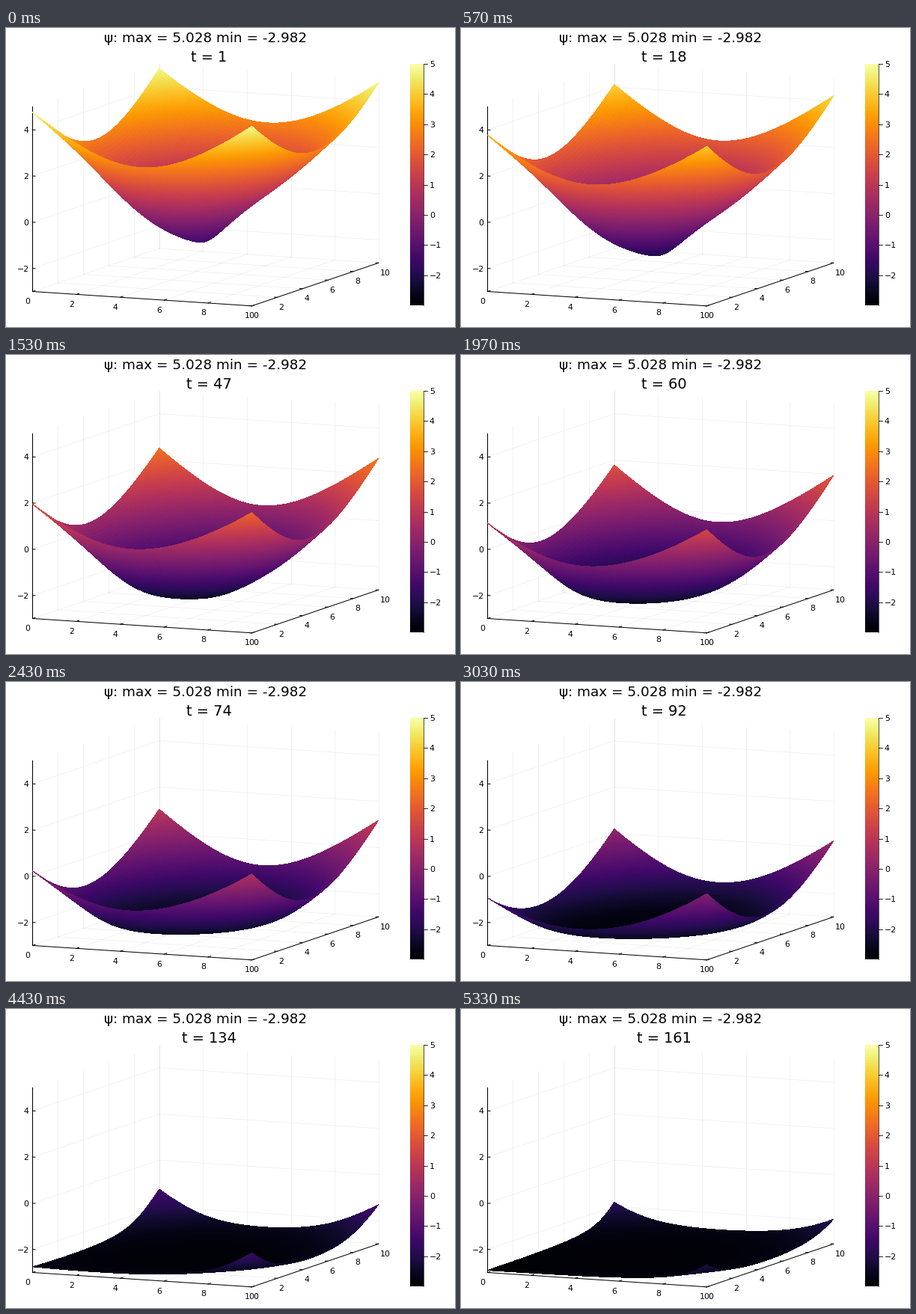
A matplotlib script that plays this animation: 600 by 400 pixels, repeating every 5.36 s.

```python
import numpy as np
import matplotlib.pyplot as plt
from matplotlib.animation import FuncAnimation

W, H, DPI = 600, 400, 100
LOOP_MS, TICK_MS = 5360, 20
STEP_MS = 100 / 3
PX = 72 / DPI
ZMIN, ZMAX = -3, 5
plt.rcParams["font.family"] = "DejaVu Sans"

fig = plt.figure(figsize=(W / DPI, H / DPI), dpi=DPI, facecolor="white")
ax = fig.add_axes([0, 0, 1, 1])
ax.set_xlim(0, W)
ax.set_ylim(H, 0)
ax.axis("off")


def project(x, y, z):
    """Parallel projection of the 10 x 10 x 8 box to stage pixels."""
    return (35.5 + 29.3 * x + 16.92 * y,
            352.5 + 1.93 * x - 5.75 * y - 30.9 * (z - ZMIN))


def segment(p, q, **style):
    (x0, y0), (x1, y1) = project(*p), project(*q)
    ax.plot([x0, x1], [y0, y1], **style)


def label(x, y, value, ha="left"):
    ax.text(x, y, str(value).replace("-", "\u2212"), fontsize=11 * PX,
            ha=ha, va="center_baseline")


# Grid, axes and tick labels
grid = dict(color="black", alpha=0.07, lw=0.5, zorder=1)
line = dict(color="black", lw=PX, zorder=2, snap=False)
for v in range(0, 11, 2):
    segment((v, 0, ZMIN), (v, 10, ZMIN), **grid)
    segment((v, 10, ZMIN), (v, 10, ZMAX), **grid)
    segment((0, v, ZMIN), (10, v, ZMIN), **grid)
    segment((0, v, ZMIN), (0, v, ZMAX), **grid)
    segment((v, 0, ZMIN), (v, 0.2, ZMIN), **line)
    segment((10, v, ZMIN), (9.88, v, ZMIN), **line)
    x, y = project(v, 0, ZMIN)
    label(x - 10, y + 12.5, v)
    x, y = project(10, v, ZMIN)
    label(x + 2, y + 12.5, v)
for v in range(-2, 5, 2):
    segment((0, 0, v), (0, 10, v), **grid)
    segment((0, 10, v), (10, 10, v), **grid)
    segment((0, 0, v), (0.12, 0, v), **line)
    label(30.5, project(0, 0, v)[1], v, "right")
segment((0, 0, ZMIN), (0, 0, ZMAX), **line)
segment((0, 0, ZMIN), (10, 0, ZMIN), **line)
segment((10, 0, ZMIN), (10, 10, ZMIN), **line)

# Colour bar
ax.pcolormesh([540, 558], np.linspace(371, 48, 257), np.arange(256)[:, None],
              cmap="inferno", antialiased=False)
ax.plot([558, 558], [48, 371], color="black", lw=0.5)
for v in range(-2, 6):
    y = 48 + (ZMAX - v) * 323 / 8
    ax.plot([558, 563], [y, y], color="black", lw=0.6)
    label(566, y, v)

ax.text(267, 19, "ψ: max = 5.028 min = -2.982", fontsize=18.4 * PX,
        ha="center", va="baseline")
counter = ax.text(271, 45, "", fontsize=19.4 * PX, ha="center", va="baseline")

# Rows run from back to front so that near cells cover far ones
N = 90
X, Y = np.meshgrid(np.linspace(0, 10, N + 1), np.linspace(10, 0, N + 1))
DX, DY = X - 5, Y - 5
R, THETA = np.hypot(DX, DY), np.arctan2(DY, DX)

CONE = 0.95 + 0.96 * np.hypot(R, 0.35)
RING = 0.3 * np.exp(-((R - 3) / 2) ** 2)
LEAN = -0.35 * (0.87 * DX + 0.5 * DY) * np.exp(-R ** 2 / 8)
LOBES = (0.3 * np.cos(3 * THETA + 0.96) - 0.2 * np.sin(THETA)) \
    * np.tanh(R / 4) ** 2
CORNER = (1 - (X + Y) / 20) ** 3
SADDLE = DX * DY / 25


def height(t):
    """A sinking cone, uneven by direction, that settles on a soft floor."""
    sink = 7.9 * np.tanh((t / 120) ** 1.2)
    u = (CONE - RING - LEAN - sink
         - (1 - np.exp(-t / 20)) * LOBES
         - 2.4 * (t / 134) ** 4 * CORNER
         - 0.5 * (t / 161) ** 3 * SADDLE)
    return ZMIN + u / 2 + np.sqrt(u * u / 4 + 0.5)


surface = []
shown = [None]


def update(k):
    # A new step falls every third of 100 ms, rounded to whole ticks
    t = 1 + int((k * TICK_MS + 15) / STEP_MS)
    if t != shown[0]:
        shown[0] = t
        while surface:
            surface.pop().remove()
        z = height(t)
        px, py = project(X, Y, z)
        cells = (z[1:, 1:] + z[1:, :-1] + z[:-1, 1:] + z[:-1, :-1]) / 4
        surface.append(ax.pcolormesh(px, py, cells, cmap="inferno", vmin=ZMIN,
                                     vmax=ZMAX, antialiased=False, snap=False,
                                     zorder=3))
        counter.set_text(f"t = {t}")
    return surface + [counter]


anim = FuncAnimation(fig, update, frames=LOOP_MS // TICK_MS, interval=TICK_MS,
                     repeat=True, repeat_delay=0, blit=False)
plt.show()
```
